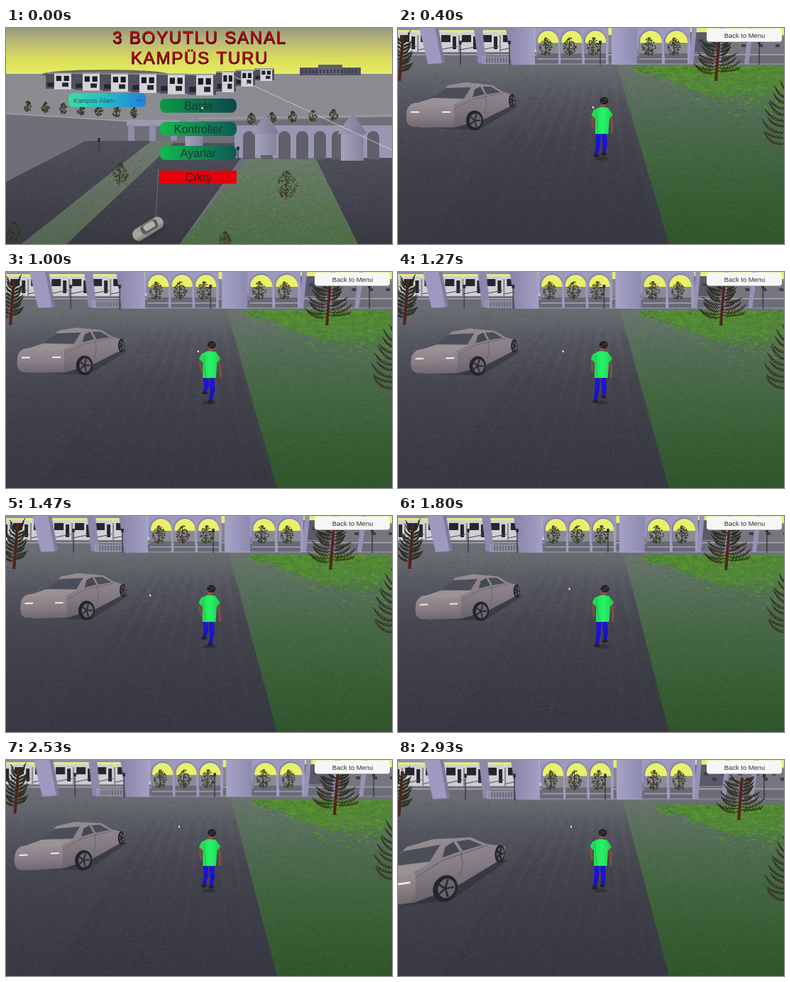
These frames come from a looping animation (544x306 px, 2.99 s). An HTML page with a canvas:

```html
<!DOCTYPE html>
<html lang="tr">
<head>
<meta charset="utf-8">
<title>3 Boyutlu Sanal Kampüs Turu</title>
<style>
html, body { margin: 0; width: 100%; height: 100%; overflow: hidden; background: #44444e; }
canvas { display: block; width: 544px; height: 306px; }
</style>
</head>
<body>
<canvas id="stage" width="544" height="306"></canvas>
<script>
const W = 544, H = 306, LOOP = 2990, MENU = 400, STEP = 200 / 3;
const FONT = '"Liberation Sans", Arial, sans-serif';
const stage = document.getElementById('stage').getContext('2d');
let g = stage;

function rng(seed) {
  return () => {
    seed = (seed * 1664525 + 1013904223) >>> 0;
    return seed / 4294967296;
  };
}
function repeat(n, draw) {
  for (let i = 0; i < n; i++) draw(i);
}
function layer(w, h, paint) {
  const c = document.createElement('canvas');
  c.width = w;
  c.height = h;
  const prev = g;
  g = c.getContext('2d');
  paint();
  g = prev;
  return c;
}

function trace(pts) {
  g.beginPath();
  for (let i = 0; i < pts.length; i += 2) g.lineTo(pts[i], pts[i + 1]);
}
function poly(fill, ...pts) {
  trace(pts);
  g.fillStyle = fill;
  g.fill();
}
function line(color, width, ...pts) {
  trace(pts);
  g.strokeStyle = color;
  g.lineWidth = width;
  g.stroke();
}
function rect(fill, x, y, w, h) {
  g.fillStyle = fill;
  g.fillRect(x, y, w, h);
}
function oval(fill, x, y, rx, ry) {
  g.beginPath();
  g.ellipse(x, y, rx, ry, 0, 0, 7);
  g.fillStyle = fill;
  g.fill();
}
function pill(fill, x, y, w, h, r) {
  g.beginPath();
  g.roundRect(x, y, w, h, r);
  g.fillStyle = fill;
  g.fill();
}
function fade(x0, y0, x1, y1, ...colors) {
  const f = g.createLinearGradient(x0, y0, x1, y1);
  colors.forEach((c, i) => f.addColorStop(i / (colors.length - 1), c));
  return f;
}
function text(str, x, y, size, fill, align = 'center') {
  g.font = size + 'px ' + FONT;
  g.textAlign = align;
  g.fillStyle = fill;
  g.fillText(str, x, y);
}

// Soft speckle for the path drawn last
const grain = layer(256, 128, () => {
  const r = rng(7);
  repeat(3500, i => rect(i & 1 ? 'rgba(0,0,0,.06)' : 'rgba(255,255,255,.03)', r() * 256, r() * 128, 1 + r() * 4, 1));
});
function speckle(dx = 0, dy = 0) {
  g.save();
  g.clip();
  g.translate(dx, dy);
  rect(g.createPattern(grain, 'repeat'), -dx, -dy, W, H);
  g.restore();
}

// Ground band running from the gate line down to the bottom edge
function strip(top, bottom, y, x0, x1, x2, x3) {
  poly(fade(0, y, 0, H, top, bottom), x0, y, x1, y, x3, H, x2, H);
  speckle();
}

function cursor(x, y) {
  trace([x, y, x, y + 4.6, x + 1.2, y + 3.6, x + 3.4, y + 3.4, x, y]);
  g.strokeStyle = '#222';
  g.lineWidth = 1;
  g.stroke();
  g.fillStyle = '#fff';
  g.fill();
}

function bush(x, y, h, seed) {
  const r = rng(seed), greens = ['#22341d', '#34512c', '#5c3226', '#1b271a'];
  line('#4a2c26', 1, x, y, x, y - h);
  repeat(h * 4, i => {
    const v = r(), half = h * 0.36 * Math.sin(Math.PI * (0.15 + v * 0.8));
    rect(greens[i & 3], x + (r() * 2 - 1) * half, y - h * (0.1 + v * 0.9), 1.5, 1.3);
  });
}

// Conifer with branches that sweep out and curl up
function pine(x, base, h, w, seed) {
  const r = rng(seed);
  line('#512520', h / 15, x, base, x + h * 0.08, base - h);
  repeat(20, i => {
    const v = i / 20, side = i & 1 ? 1 : -1, reach = side * w / 2 * (1 - v * 0.55) * (0.7 + r() * 0.4);
    const bx = x + h * 0.08 * v, y = base - h * (0.2 + v * 0.78), lift = h * (0.04 + r() * 0.1);
    g.beginPath();
    g.moveTo(bx, y);
    g.quadraticCurveTo(bx + reach * 0.7, y + lift * 0.6, bx + reach, y - lift);
    g.strokeStyle = i % 3 ? '#3b2a20' : '#5e2620';
    g.lineWidth = 1.1;
    g.stroke();
    for (let u = 0.3; u <= 1; u += 0.14) {
      const px = bx + reach * u, py = y + lift * (1.2 * u * (1 - u) - u * u);
      line('#252c1e', 1.1, px - side * 2, py + 2, px + side * 2, py - 3);
    }
  });
}

function lamp(x, base, h) {
  line('#34343f', 1.3, x, base, x, base - h);
  rect('#2a2a35', x - 1.8, base - h - 4, 3.6, 5);
}

function arch(fill, x, top, w, base) {
  pill(fill, x, top, w, base - top, [w / 2, w / 2, 0, 0]);
}

// Campus wing: slate wall, white front, dark glazing
function wing(x, y, w, h) {
  rect('#514f5e', x, y + 2, w, h - 3);
  rect('#d3d2d6', x + w * 0.3, y, w * 0.6, h);
  repeat(2, i => rect('#1b1b22', x + w * (0.37 + i * 0.27), y + h * 0.2, w * 0.18, h * 0.3));
  repeat(2, i => rect('#24242c', x + w * (0.06 + i * 0.52), y + h * 0.6, w * 0.22, h * 0.24));
  rect('#8d8c97', x, y, w, 1.5);
}

function tower(x, w, base) {
  rect(fade(x - w / 2, 0, x + w / 2, 0, '#a5a2bd', '#85839f'), x - w / 2, 148, w, base - 148);
  poly(fade(x - w / 2, 0, x + w / 2, 0, '#9a97b2', '#7c7a96'), x, 120, x + w * 0.65, 150, x - w * 0.65, 150);
}

function menuButton(label, y, left, right) {
  pill(fade(217, 0, 325, 0, left, right), 217, y, 108, 20, 8);
  text(label, 271, y + 16, 16, '#1d3932');
}

const menu = layer(W, H, () => {
  rect(fade(0, 0, 0, 64, '#98997f', '#bcbc76', '#dadb5c', '#e6ec62'), 0, 0, W, 67);
  rect('#8b8b92', 0, 65, W, H);
  oval('#6a6b62', 140, 66, 90, 7);
  rect('#52515f', 414, 56, 86, 11);
  rect('#605f6e', 440, 52, 34, 14);
  repeat(16, i => rect('#3c3b4a', 417 + i * 5, 59, 2, 5));

  repeat(3, i => wing(350 - i * 27, 57 + i * 2, 28, 18 + i * 6));
  repeat(6, i => wing(56 + i * 40, 63 + i * 0.4, 40, 24 + i * 1.3));

  poly('#6f6f78', 0, 122, 190, 134, W, 126, W, H, 0, H);
  repeat(2, i => line('#a9a8b2', 1, i * 270, 121 + i * 7, 190 + i * 354, 133 - i * 9));
  repeat(7, i => bush(30 + i * 25, 119 + i * 1.5, 16, 20 + i));
  repeat(5, i => bush(345 + i * 29, 137 - i * 1.3, 17, 40 + i));

  strip('#50505b', '#383842', 160, 112, 205, -170, 22);
  strip('#707b70', '#536553', 160, 205, 236, 22, 85);
  strip('#50505b', '#383842', 163, 236, 346, 85, 245);
  strip('#6b7d6b', '#4c6c45', 178, 346, 434, 245, 496);
  strip('#50505b', '#383842', 180, 434, 640, 496, 640);
  const r = rng(15);
  repeat(600, i => {
    const v = r();
    rect(i & 1 ? 'rgba(90,145,60,.5)' : 'rgba(140,150,140,.3)', 346 - 98 * v + r() * (85 + 150 * v), 178 + v * 128, 2, 1.3);
  });

  rect('#9b98b2', 170, 130, 75, 9);
  repeat(3, i => rect('#8f8ca8', 172 + i * 30, 137, 9, 23));
  tower(265, 25, 168);
  rect('#9a97b3', 322, 138, 222, 46);
  repeat(8, i => arch('#60606c', 334 + i * 25, 146, 17, 186));
  tower(366, 30, 180);
  tower(488, 32, 188);
  line('#d5d5d8', 0.8, 290, 54, W, 173);
  repeat(2, i => lamp(131 + i * 196, 174 + i * 12, 14));
  line('rgba(190,190,198,.5)', 0.7, 215, 200, 211, 268);

  // Trees near the camera and the parked car
  bush(160, 223, 32, 61);
  bush(395, 243, 41, 62);
  bush(10, 306, 32, 63);
  bush(308, 312, 24, 64);
  g.save();
  g.translate(201, 284);
  g.rotate(-0.55);
  pill('#34343d', -24, -8, 47, 22, 8);
  pill(fade(0, -9, 0, 10, '#9b9894', '#aaa7a0', '#73716f'), -25, -9, 48, 18, 8);
  pill('#5a5a60', -11, -8, 26, 13, 5);
  pill('#b3b0aa', -6, -7, 17, 9, 3);
  g.restore();

  pill(fade(88, 92, 197, 112, '#39dfa4', '#28b8c4', '#1c7fe0'), 88, 92, 109, 20, 7);
  text('Kampüs Alanı', 95, 106, 9.2, '#24536a', 'left');
  line('#235d96', 1.2, 184, 101, 187, 104, 190, 101);
  menuButton('Başla', 100, '#10994a', '#0b474a');
  menuButton('Kontroller', 133, '#15b94d', '#0c5a57');
  menuButton('Ayarlar', 167, '#15b94d', '#0c5a57');
  rect('#e4000b', 217, 202, 108, 18.5);
  text('Çıkış', 271, 217, 16, '#351a1c');

  g.letterSpacing = '1.8px';
  ['3 BOYUTLU SANAL', 'KAMPÜS TURU'].forEach((s, i) => {
    const y = 22 + i * 28.5;
    text(s, 273.5, y + 0.8, 24, '#2a0505');
    g.strokeStyle = '#4a0808';
    g.lineWidth = 0.8;
    g.strokeText(s, 273, y);
    text(s, 272.7, y, 24, fade(0, y - 18, 0, y, '#c8101c', '#850710'));
  });
  g.letterSpacing = '0px';
  cursor(275.5, 111);
});

// Far scenery with a 60px margin on each side so it can slide
const far = layer(W + 120, 60, () => {
  g.translate(60, 0);
  rect('#e6ee78', -60, 0, 664, 12);
  rect('#85858f', -60, 10, 664, 50);
  rect('#6c6c77', -60, 35, 664, 18);
  rect('#a9a8b2', -60, 37, 664, 1.5);
  repeat(9, i => {
    const x = -58 + i * 29;
    rect('#cfcfd4', x, 6, 27, 28);
    rect('#26262e', x + 3, 10, 13, 10);
    rect('#26262e', x + 19, 12, 5, 18);
    line('#44434f', 1, x, 31, x + 26, 26);
  });
  rect('#5b5a68', 396, 6, 60, 28);
  rect('#77767f', 455, 13, 140, 24);
  repeat(14, i => rect('#3f3f4b', 400 + i * 12, 16 + (i & 1) * 7, 6, 4));

  function arcade(x0, n, w, gap) {
    rect('#9d99bf', x0 - gap, 0, n * (w + gap) + gap, 30);
    repeat(n, i => {
      const x = x0 + i * (w + gap);
      arch('#8581a8', x - 1, 2, w + 2, 40);
      arch('#e9f16b', x + 1, 4, w - 1, 40);
      rect('#8b8b95', x + 1, 21, w - 1, 16);
      rect('#696974', x, 36, w, 15);
      line('#c2bfda', 1, x, 44, x + w, 44);
      rect('#a29ec4', x + w, 16, gap, 35);
      bush(x + w * 0.4, 40, 27, 80 + i + n);
    });
  }
  arcade(196, 3, 30, 3.5);
  arcade(340, 2, 32, 4);

  rect('#8f8bb1', -60, 0, 250, 3);
  poly('#9d99bf', 30, 0, 52, 0, 62, 50, 42, 51);
  poly('#7d7a9f', 52, 0, 57, 0, 66, 49, 62, 50);
  poly('#8c89ad', 107, 0, 119, 0, 124, 50, 113, 50);
  poly(fade(153, 0, 194, 0, '#8885a9', '#a5a1c6'), 152, 0, 192, 0, 193, 52, 160, 52);
  rect(fade(301, 0, 338, 0, '#a7a3c8', '#8d8ab0'), 301, 0, 36, 52);
  repeat(3, i => poly('#9692b7', 414 + i * 40, 0, 421 + i * 40, 0, 416 + i * 39, 51, 410 + i * 39, 51));
  repeat(10, i => line('#aaa7c4', 1, 119 + i * 4, 41, 119 + i * 4, 50));
  repeat(2, i => line('#aaa7c4', 1, 118, 41 + i * 9, 157, 41 + i * 9));
  line('#a19eb8', 1, 192, 51, 604, 51);
  for (const x of [88, 157, 285, 509]) lamp(x, 56, 34);
});

// Sunlit meadow, denser toward its far edge
const lawn = layer(W + 80, H, () => {
  const r = rng(33), greens = ['#4b8730', '#57962c', '#427c30', '#5f9e30'];
  poly(fade(0, 54, 0, 112, '#54882fee', '#4f8c2fbb', '#4a803000'), 336, 54, 640, 54, 640, 130, 440, 96);
  repeat(1100, i => {
    const x = 332 + r() * 290, v = Math.pow(r(), 1.8);
    rect(greens[i & 3], x, 54 + v * (8 + (x - 332) * 0.34), 2 + r() * 4, 1.2);
  });
  repeat(90, i => {
    const x = 380 + r() * 240, y = 70 + r() * (x - 350) * 0.55;
    line(greens[i & 3] + '99', 1.3, x, y, x + 3 + r() * 4, y - 2 + r() * 4);
  });
});

function ease(t, a, b) {
  const u = Math.min(1, Math.max(0, (t - a) / (b - a)));
  return u * u * (3 - 2 * u);
}
function bump(t, mid, width) {
  return Math.exp(-(((t - mid) / width) ** 2));
}
function ramp(t, a, b) {
  return Math.min(1, Math.max(0, (t - a) / (b - a)));
}

function wheel(x, y, rx, ry) {
  oval('#24242a', x, y, rx, ry);
  oval('#68666c', x + rx * 0.1, y, rx * 0.7, ry * 0.72);
  repeat(5, i => {
    const a = i * Math.PI * 0.4;
    line('#2b2b31', 2, x, y, x + Math.cos(a) * rx * 0.7, y + Math.sin(a) * ry * 0.7);
  });
}

// Placed by its two visible wheels; `tall` scales the height
function car(x, y, dx, dy, tall) {
  g.save();
  g.transform(dx / 53, (dy + 28 * tall) / 53, 0, tall, x, y);
  g.translate(-107, -131);
  poly('rgba(35,35,44,.4)', 14, 139, 112, 145, 168, 111, 150, 104);
  poly(fade(0, 77, 0, 141, '#958d92', '#857d83', '#68636a'),
    10, 126, 14, 112, 49, 99, 70, 81, 95, 77, 132, 81, 146, 90, 165, 96, 165, 107, 119, 130, 78, 141, 30, 141, 13, 136);
  pill(fade(0, 105, 0, 140, '#9a9196', '#8b8288', '#716a71'), 11, 106, 67, 34, [14, 8, 6, 10]);
  poly('#9a9297', 20, 108, 49, 99, 93, 101, 74, 110);
  poly('#4b4e58', 47, 99, 66, 85, 102, 84, 92, 100);
  poly('#454852', 104, 98, 107, 87, 115, 83, 121, 94);
  poly('#4b4e58', 118, 83, 130, 83, 143, 91, 124, 94);
  line('#625d64', 0.8, 122, 94, 124, 108, 121, 121);
  line('#625d64', 0.8, 78, 115, 104, 101, 148, 92);
  repeat(2, i => rect('#efe3e2', 17 + i * 44, 118, 12, 2.2));
  wheel(107, 131, 12, 14);
  wheel(160, 103, 5, 9.5);
  g.restore();
}

function leg(hip, knee, foot, footY) {
  const kneeY = (150 + footY) / 2;
  line('#1d16d2', 7, hip, 152, knee, kneeY);
  line('#1a13c4', 5.5, knee, kneeY, foot, footY - 4);
  oval('#282126', foot - 0.5, footY, 4, 2.3);
}

function walker(dx, phase) {
  const s = Math.cos(phase * 2 * Math.PI);
  g.save();
  g.translate(dx, 0);
  g.lineCap = g.lineJoin = 'round';
  oval('rgba(20,20,28,.3)', 287, 185, 10, 3);
  leg(282, 282.5 + s, 280.5 + s, 177 - s * 6.5);
  leg(290.5, 291.5, 290 - s, 180.5 + s * 3.5);
  line('#80503c', 3.3, 275, 124, 274, 132, 276 + s, 140);
  line('#80503c', 3.3, 300, 124, 302, 136, 302 + s, 148);
  rect('#875540', 286, 105, 6, 9);
  poly(fade(276, 0, 302, 0, '#21dc50', '#27f26a', '#1bd34c'),
    272.5, 123, 276, 116, 285, 112, 296, 113, 303, 123, 298, 128, 296.5, 150, 278, 150, 278, 128);
  line('#15b743', 0.9, 279, 118, 280, 130, 282, 148);
  oval('#201e23', 290.5, 103, 6, 5.3);
  const r = rng(5);
  repeat(12, () => rect('#57525a', 286 + r() * 8, 99 + r() * 7, 1.2, 1));
  g.restore();
}

function game(t) {
  // Walk forward, brief look aside, then close in on the parked car
  const look = bump(t, 2130, 300), drift = ramp(t, 600, 2130), near = ramp(t, 2130, 2930) ** 3;
  const pan = 7 * ramp(t, 600, 1470) + 13 * look;
  const sy = 5 * near, edge = 52 + sy, top = 308 + pan * 0.85 + 3 * near;
  const stride = 3.7 * ((t - MENU) / 1730) ** 0.8;

  g.drawImage(far, pan - 60, 0, W + 120, 60 + sy);
  g.beginPath();
  g.rect(0, edge, W, H);
  g.fillStyle = fade(0, 52, 0, H, '#696d71', '#54555e', '#474751', '#40404b', '#3c3c47', '#393944');
  g.fill();
  speckle(pan, t / 40);
  repeat(9, i => {
    const x = top - 110 + i * 14;
    poly('rgba(25,25,40,.05)', x, 85, x + 5, 85, x * 2.6 - 440, H, x * 2.6 - 475, H);
  });
  poly(fade(0, 52, 0, H, '#6b756f', '#526d56', '#42663f', '#385d34', '#30552c'), top, edge, W, edge, W, H, 382, H);
  speckle(pan, t / 40);

  const treeX = 448 + pan * 1.3 + 23 * near, treeY = 75 + 2 * drift + 8 * near;
  g.drawImage(lawn, treeX - 448, treeY - 75);
  pine(2 + pan * 1.3 - 10 * near, 75 + sy, 64, 38, 91);
  pine(treeX, treeY, 60, 64, 92);
  pine(548 + pan * 0.6, 184 + 34 * near, 106, 76, 93);

  car(108 + pan * 0.8 - 47 * near, 131 + 5 * drift + 46 * near,
    53 - 3 * drift + 27 * near, -28 - drift - 20 * near, 1 - 0.03 * drift + 0.37 * near);
  walker(9 * look - 2 * ramp(t, 600, 2130), stride - 0.66);

  pill('#b8b8ba', 435, 1, 106, 19, 4);
  pill('#f6f6f6', 435, 0.5, 106, 18.5, 4);
  text('Back to Menu', 488.5, 13.5, 9.4, '#323232');
  const turn = ease(t, 1470, 2130);
  cursor(274 - 31 * turn - 72 * bump(t, 1470, 280), 110 - 18 * turn);
}

const start = performance.now();
let shown = null;
function tick() {
  const t = (performance.now() - start) % LOOP;
  const step = t < MENU ? -1 : Math.floor((t - MENU + 3.4) / STEP);
  if (step !== shown) {
    shown = step;
    if (step < 0) stage.drawImage(menu, 0, 0);
    else game(MENU + step * STEP);
  }
  requestAnimationFrame(tick);
}
tick();
</script>
</body>
</html>
```
